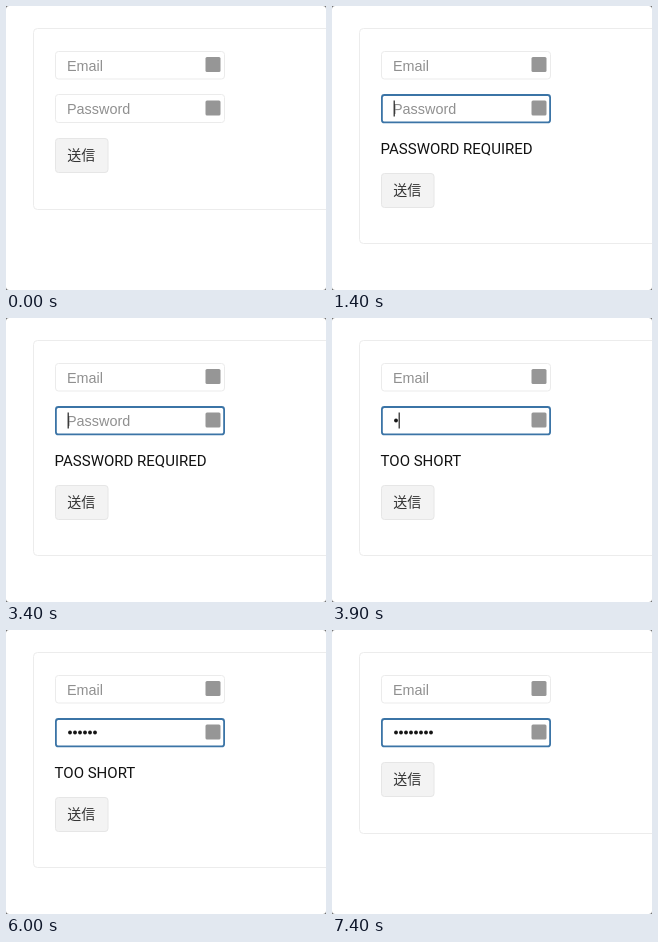
These frames come from a looping animation (320 by 284 pixels, 7600 ms). An HTML page with a canvas:

```html
<!DOCTYPE html>
<html lang="ja">
<head>
<meta charset="utf-8">
<title>Form validation</title>
<style>
html, body { margin: 0; width: 100%; height: 100%; overflow: hidden; background: #fff; }
canvas { display: block; width: 320px; height: 284px; }
</style>
</head>
<body>
<canvas id="stage"></canvas>
<script>
const W = 320, H = 284, LOOP = 7600;
const canvas = document.getElementById('stage');
const ctx = canvas.getContext('2d');
const dpr = window.devicePixelRatio || 1;
canvas.width = W * dpr;
canvas.height = H * dpr;

const LATIN = '14.4px "Liberation Sans", Arial, sans-serif';
const MESSAGE = '15px Roboto, sans-serif';
const JAPANESE = '14px "Noto Sans CJK JP", "Noto Sans CJK", sans-serif';

const FOCUS = 1400, ACCEPTED = 6900;
const KEYS = [3900, 4300, 4500, 4800, 5300, 5500, 6200, 6900];
const BLINK = 500;

const between = (t, a, b) => t >= a && t < b;

function box(x, y, w, h, r, fill, stroke, line = 1) {
  ctx.beginPath();
  ctx.roundRect(x, y, w, h, r);
  if (fill) {
    ctx.fillStyle = fill;
    ctx.fill();
  }
  if (stroke) {
    ctx.strokeStyle = stroke;
    ctx.lineWidth = line;
    ctx.stroke();
  }
}

function label(text, x, y, font, color) {
  ctx.font = font;
  ctx.fillStyle = color;
  ctx.fillText(text, x, y);
}

function icon(y, active) {
  box(199.5, y, 15, 15, 1.5, active ? '#111' : '#969696');
}

function passwordField(t) {
  const focused = t >= FOCUS;
  if (focused) box(49.9, 89, 168.2, 27.4, 2.5, '#fff', '#3b74a6', 1.8);
  else box(49.5, 88.5, 169, 28, 3, '#fff', '#ebebeb');

  const typed = KEYS.filter(k => t >= k).length;
  if (!typed) label('Password', 61, 107.5, LATIN, '#909090');
  ctx.fillStyle = '#151515';
  for (let i = 0; i < typed; i++) {
    ctx.beginPath();
    ctx.arc(64 + 5 * i, 102.5, 1.9, 0, Math.PI * 2);
    ctx.fill();
  }

  // The blink restarts with every key press.
  const since = t - (typed ? KEYS[typed - 1] : FOCUS);
  if (focused && Math.floor(since / BLINK) % 2 === 0) {
    ctx.fillStyle = '#222';
    ctx.fillRect(61.6 + 5 * typed, 94.5, 1.2, 16);
  }
  icon(94.5, between(t, 500, 700) || between(t, 2000, 3000));
}

function draw(t) {
  const error = t < FOCUS || t >= ACCEPTED ? ''
    : t < KEYS[0] ? 'PASSWORD REQUIRED' : 'TOO SHORT';
  const shift = error ? 35 : 0;

  ctx.setTransform(dpr, 0, 0, dpr, 0, 0);
  ctx.fillStyle = '#666';
  ctx.fillRect(0, 0, W, H);
  box(0, 0, W, H, 3, '#fff');
  box(27.5, 22.5, W, 181 + (error ? 34 : 0), 4, '#fff', '#ececec');

  box(49.5, 45.5, 169, 27.5, 3, '#fff', '#ebebeb');
  label('Email', 61, 65, LATIN, '#909090');
  icon(51, between(t, 3000, 3100));

  passwordField(t);
  if (error) label(error, 48.6, 148, MESSAGE, '#111');

  box(49.5, 132.5 + shift, 52.5, 34, 3, '#f3f3f3', '#e6e6e6');
  label('送信', 61.3, 154 + shift, JAPANESE, '#333');
}

const start = performance.now();
function tick() {
  draw((performance.now() - start) % LOOP);
  requestAnimationFrame(tick);
}
tick();
</script>
</body>
</html>
```
